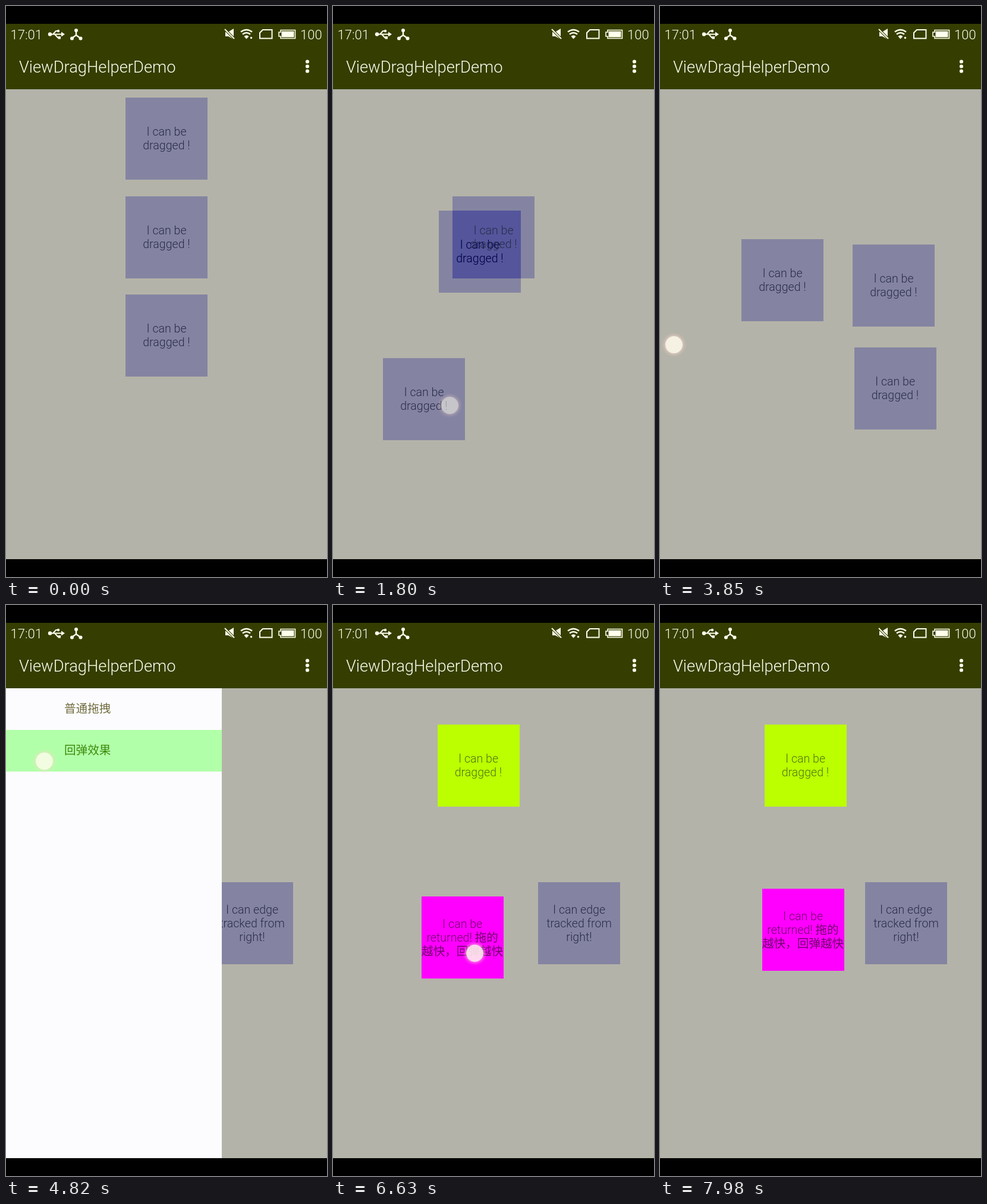
Write an HTML page that moves like this. It is 540x960 px and loops after 8000 ms.

```html
<!DOCTYPE html>
<html lang="en">
<head>
<meta charset="utf-8">
<title>ViewDragHelperDemo</title>
<style>
  html, body { margin: 0; width: 100%; height: 100%; overflow: hidden; background: #000; }
  #stage {
    position: relative; width: 540px; height: 960px; overflow: hidden; background: #000;
    font: 300 19.6px/23px Roboto, "Noto Sans CJK SC", "Noto Sans CJK", sans-serif;
  }
  #bar { position: absolute; left: 0; top: 30px; width: 540px; height: 110px; background: #353e00; }
  .page { position: absolute; left: 0; top: 0; width: 540px; height: 930px; overflow: hidden;
    background: #b4b3a9; clip-path: inset(140px 0 0); }
  .box { position: absolute; width: 138px; height: 138px; display: flex;
    align-items: center; justify-content: center; text-align: center; color: #2b2d4c; }
  .box::before { content: ""; position: absolute; inset: 0; background: #302f07; mix-blend-mode: difference; }
  .box span { position: relative; white-space: nowrap; }
  .solid::before { background: var(--fill); mix-blend-mode: normal; }
  #first { left: 201px; top: 154px; }
  #second { left: 201px; top: 320px; }
  #third { left: 201px; top: 485px; }
  #lime { left: 175.5px; top: 201px; --fill: #bbff00; color: #4f7512; }
  #back { left: 171.5px; top: 477px; --fill: #ff00ff; color: #70006c; }
  #edge { left: 345px; top: 466px; }
  #drawer { position: absolute; left: -363px; top: 140px; width: 363px; height: 790px; background: #fcfcff; }
  .item { position: absolute; left: 0; width: 265px; height: 70px; padding-left: 98px; line-height: 70px; color: #6f6c3c; }
  #pressed { background: #b2ffa9; color: #3c8a0c; }
  .touch { position: absolute; width: 29px; height: 29px; margin: -14.5px 0 0 -14.5px; border-radius: 50%;
    background: rgba(255, 251, 236, .86); box-shadow: 0 0 5px 2px rgba(255, 215, 205, .6); opacity: 0; }
</style>
</head>
<body>
<div id="stage">
  <div class="page" id="plain">
    <div class="box" id="first"><span>I can be<br>dragged !</span></div>
    <div class="box" id="second"><span>I can be<br>dragged !</span></div>
    <div class="box" id="third"><span>I can be<br>dragged !</span></div>
  </div>
  <div class="page" id="bounce">
    <div class="box solid" id="lime"><span>I can be<br>dragged !</span></div>
    <div class="box solid" id="back"><span>I can be<br>returned! 拖的<br>越快，回弹越快</span></div>
    <div class="box" id="edge"><span>I can edge<br>tracked from<br>right!</span></div>
  </div>
  <div id="drawer">
    <div class="item" style="top:0">普通拖拽</div>
    <div class="item" style="top:70px">回弹效果</div>
    <div class="item" style="top:70px" id="pressed">回弹效果</div>
  </div>
  <div id="bar">
    <svg width="540" height="110" viewBox="0 30 540 110" fill="#ffffec">
      <text x="7.5" y="56" font-size="22">17:01</text>
      <text x="495" y="56" font-size="22">100</text>
      <text x="22" y="112" font-size="27.3">ViewDragHelperDemo</text>
      <g fill="none" stroke="#ffffec" stroke-width="2">
        <path d="M74 47.5H94M79 47.5L84 42H88M82 47.5L87 53H90"/>
        <path d="M118 41V49L111 54M118 49L125 54" stroke-width="2.4"/>
        <path d="M395 43.5Q404.5 36.5 414 43.5M398 47.5Q404.5 42.5 411 47.5" stroke-width="2.6"/>
        <path d="M432 40H447.500V54.500H427V45Z"/>
        <path d="M462 40.500H486.500V54.500H462V51H459V44H462Z" stroke-width="1.6"/>
      </g>
      <circle cx="74" cy="47.500" r="3.200"/>
      <path d="M93 43.500L99 47.500L93 51.500Z"/>
      <circle cx="88" cy="42" r="2.200"/>
      <rect x="87.500" y="51" width="4.500" height="4.500"/>
      <circle cx="118" cy="41" r="3"/><circle cx="111" cy="54.500" r="3"/><circle cx="125.500" cy="54.500" r="3"/>
      <path d="M369 43.500H374L383 38V56L374 51H369Z"/>
      <path d="M368 39L385 56" stroke="#353e00" stroke-width="4"/>
      <path d="M368 39L384 55" stroke="#ffffec" stroke-width="2"/>
      <path d="M400.500 51Q404.500 47.500 408.500 51L404.500 55.500Z"/>
      <circle id="signal" cx="412.500" cy="53.500" r="1.700"/>
      <rect x="463.500" y="42.500" width="21" height="10"/>
      <circle cx="507" cy="93.500" r="3.100"/><circle cx="507" cy="101.500" r="3.100"/><circle cx="507" cy="109.500" r="3.100"/>
    </svg>
  </div>
</div>
<script>
const LOOP = 8000;
const stage = document.getElementById('stage');
const get = id => document.getElementById(id);

function play(el, keys) {
  const all = [...keys];
  if (all[0].t > 0) all.unshift({ ...all[0], t: 0 });
  all.push({ ...all[all.length - 1], t: LOOP });
  el.animate(all.map(({ t, easing = 'linear', ...style }) => ({ offset: t / LOOP, easing, ...style })),
    { duration: LOOP, iterations: Infinity });
}

// Points are [time, x, y, easing towards the next point].
const move = (el, points) => play(el, points.map(([t, x, y, easing]) =>
  ({ t, left: x + 'px', top: y + 'px', easing })));

const show = (el, from, to) => play(el, [
  { t: 0, opacity: from > 0 ? 0 : 1, easing: 'step-end' },
  ...(from > 0 ? [{ t: from, opacity: 1, easing: 'step-end' }] : []),
  ...(to < LOOP ? [{ t: to, opacity: 0, easing: 'step-end' }] : [])
]);

function touch(points) {
  const dot = stage.appendChild(document.createElement('div'));
  dot.className = 'touch';
  move(dot, points);
  const start = points[0][0], end = points[points.length - 1][0];
  play(dot, [
    { t: 0, opacity: 0, easing: 'step-end' },
    { t: start, opacity: 1 },
    { t: end - 30, opacity: 1 },
    { t: end, opacity: 0 }
  ]);
}

// Each drag is held at a fixed grip point inside the box.
function drag(id, ...drags) {
  move(get(id), drags.flatMap(d => [...d.path, ...(d.settle || [])]));
  drags.forEach(({ grip, path }) =>
    touch(path.map(([t, x, y, easing]) => [t, x + grip[0], y + grip[1], easing])));
}

drag('first',
  { grip: [76, 80], path: [[200, 201, 154], [270, 200, 172], [400, 188, 255], [540, 178, 330], [620, 178, 344], [690, 178, 344]] },
  { grip: [91, 82], path: [[2360, 178, 344], [2440, 172, 350], [2560, 145, 376], [2670, 133, 386], [2720, 134, 388], [2780, 137, 392], [2830, 137, 392]] });

drag('second',
  { grip: [88, 72], path: [[1860, 201, 320], [1930, 208, 325], [2060, 266, 362], [2170, 316, 396], [2230, 325, 404], [2280, 324, 401], [2330, 324, 401]] });

drag('third',
  { grip: [112, 79], path: [[790, 201, 485], [870, 201, 485], [930, 197, 489], [1080, 176, 512], [1300, 124, 556], [1500, 90, 588], [1620, 82, 597], [1720, 84, 592], [1820, 84, 592]] },
  { grip: [75, 76], path: [[2890, 84, 592], [2960, 92, 592], [3080, 175, 587], [3200, 272, 579], [3290, 322, 575], [3340, 326.5, 574], [3400, 326.5, 574]] });

const recoil = 'cubic-bezier(.2,.75,.3,1)';
drag('back',
  { grip: [90, 95],
    path: [[6450, 171.5, 477], [6550, 168, 479], [6630, 149, 490], [6760, 104, 548], [6870, 74, 580], [6950, 72, 582, recoil]],
    settle: [[7230, 171.5, 477]] },
  { grip: [80, 90],
    path: [[7270, 171.5, 477], [7350, 162, 500], [7450, 128, 598], [7570, 86, 735], [7630, 81, 757], [7680, 81, 757, recoil]],
    settle: [[7970, 171.5, 477]] });

touch([[3840, 23, 569], [3870, 24, 569], [4000, 128, 567], [4130, 270, 564], [4230, 335, 562]]);
touch([[4630, 64, 262], [4850, 64, 262]]);
touch([[5470, 335, 288], [5550, 310, 288], [5700, 190, 292], [5860, 45, 300]]);

move(get('drawer'), [
  [3870, -363, 140], [4000, -255, 140], [4130, -113, 140], [4230, -48, 140, 'ease-out'], [4360, 0, 140],
  [5530, 0, 140], [5700, -120, 140], [5860, -265, 140, 'ease-out'], [6050, -363, 140]
]);

show(get('bounce'), 4780, LOOP);
play(get('pressed'), [
  { t: 0, opacity: 0, easing: 'step-end' },
  { t: 4690, opacity: 0 },
  { t: 4750, opacity: 1 },
  { t: 4960, opacity: 1 },
  { t: 5200, opacity: 0 }
]);
play(get('signal'), [
  { t: 0, opacity: 1, easing: 'step-end' },
  { t: 500, opacity: 0, easing: 'step-end' },
  { t: 2250, opacity: 1, easing: 'step-end' }
]);
</script>
</body>
</html>
```
